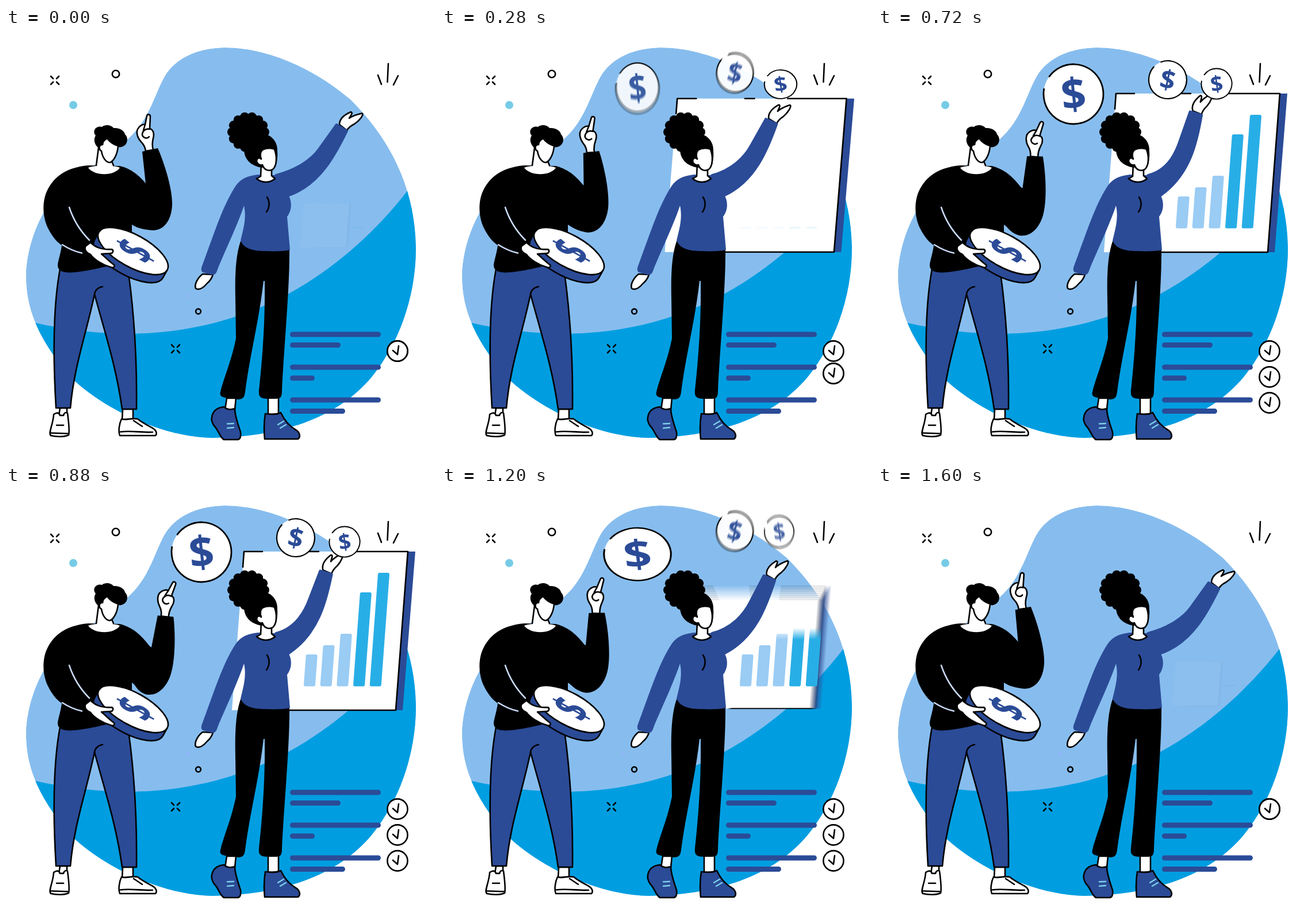
Animation, 748 px wide and 748 px high, one loop 1.64 s. Source, as an HTML page:

```html
<!DOCTYPE html>
<html lang="en">
<head>
<meta charset="utf-8">
<title>Growth presentation</title>
<style>
html, body { margin: 0; width: 100%; height: 100%; overflow: hidden; background: #fff; }
svg { display: block; width: 100vw; height: 100vh; }
.line { fill: none; stroke: #000; stroke-width: 2.6; stroke-linecap: round; stroke-linejoin: round; }
.skin { fill: #fff; stroke: #000; stroke-width: 2.6; stroke-linejoin: round; stroke-linecap: round; }
.navy { fill: #2b4b97; }
.edge { stroke: #000; stroke-width: 2.6; stroke-linejoin: round; }
.blur { isolation: isolate; }
.blur use { mix-blend-mode: plus-lighter; }
text { font-family: "Open Sans", "Noto Sans", sans-serif; font-weight: 700; text-anchor: middle; fill: #2b4b97; }
</style>
</head>
<body>
<svg viewBox="0 0 748 748">
  <defs>
    <clipPath id="blobClip"><path id="blob" d="M380 34C330 35 294 54 276 84C258 116 249 160 213 192C180 226 105 262 66 320C42 362 33 410 35 440C37 500 64 548 108 603C160 656 262 711 360 713C475 711 575 681 637 606C690 540 714 455 713 380C711 285 675 200 600 125C535 70 455 34 380 34Z"/></clipPath>
    <linearGradient id="fade" x1="0" y1="0" x2="0" y2="1">
      <stop offset="0" stop-color="#000"/><stop offset=".067" stop-color="#fff"/>
    </linearGradient>
    <mask id="wipe" maskUnits="userSpaceOnUse" x="500" y="100" width="200" height="300">
      <rect id="wipeRect" x="500" width="200" height="300" fill="url(#fade)"/>
    </mask>
    <!-- the board grows from its base, so its zero point lies there -->
    <g id="boardArt"><g transform="translate(-558 -379)">
      <path d="M699 114H712L690 390H678Z" class="navy"/>
      <path d="M414 114H699L678 390H393Z" fill="#fff"/>
      <path d="M412 141L414 114H446M528 114H544M600 114H699L678 390H480" class="line"/>
    </g></g>
    <g id="tick">
      <circle r="17.6" class="skin"/>
      <path d="M-8 -1L0 6L2 -9" class="line"/>
    </g>
    <path id="cross" class="line" d="M-7 -7l4 4M7 -7l-4 4M-7 7l4 -4M7 7l-4 -4"/>
  </defs>

  <g clip-path="url(#blobClip)">
    <use href="#blob" fill="#87bdee"/>
    <path d="M30 508C200 550 330 532 440 487C540 445 630 372 700 281L748 220V748H0V500Z" fill="#009ee1"/>
  </g>

  <use href="#cross" x="85" y="91"/>
  <use href="#cross" x="295" y="558"/>
  <circle cx="191" cy="80" r="6.2" class="line"/>
  <circle cx="334.5" cy="493" r="4.4" class="line"/>
  <circle cx="117" cy="134" r="7" fill="#76cbe6"/>
  <circle cx="316" cy="466" r="3" fill="#8fb5f6"/>
  <path d="M665 62L663.5 94M647 82L653 98M682 83L674 99" class="line"/>

  <g id="board" class="blur"></g>
  <g id="bars" mask="url(#wipe)" stroke-width="6" stroke-linejoin="round"></g>

  <path d="M498.500 533h149M498.500 551.500h79M498.500 590h149M498.500 609h34M498.500 647h149M498.500 666.500h87" stroke="#2b4b97" stroke-width="9" stroke-linecap="round"/>
  <use href="#tick" x="681" y="562"/>
  <use href="#tick" x="681" id="tick2"/>
  <use href="#tick" x="681" id="tick3"/>

  <!-- man -->
  <g>
    <path d="M94 661L92 674H106L106 661Z" class="skin"/>
    <path d="M203 663L202 682H221L221 663Z" class="skin"/>
    <path d="M83 672C88 669 92 668 94 674L100 674C101 669 105 668 107 670C109 685 111 700 109 708C100 712 86 711 78 709C73 704 82 690 83 672Z" class="skin"/>
    <path d="M88 691H100M79 704.500L108 705.500" class="line"/>
    <path d="M201 680C208 683 216 678 229 680C236 686 246 691 255 696C262 700 263 706 260 709H198C195 702 197 688 201 680Z" class="skin"/>
    <path d="M199 702.500C218 700 236 704 255 703M222 683L237 693" class="line"/>
    <path d="M97 405C82 470 81 560 87 661L112 661C118 590 140 530 154 463C172 530 192 590 202 663H227C228 580 223 490 210 405Z" class="navy edge"/>
    <path d="M154 464C154 457 160 451 168 450" class="line"/>
    <path d="M143 239C110 242 86 255 73 280C62 300 63 330 74 350C80 362 88 372 97 378C95 392 92 400 90 411C89 422 98 427 118 425C150 422 165 416 190 412L219 400V342L250 320V279C236 260 220 245 198 240Z"/>
    <path d="M143 243C155 238 186 238 198 243C188 258 154 258 143 243Z" fill="#fff"/>
    <path d="M161 208L157 240C165 247 180 246 187 239L184 231Z" fill="#fff"/>
    <path d="M161 208L157 239M184 232L187 239" class="line"/>
    <path d="M161 209C153 202 152 193 156 187C149 179 157 169 167 172C173 167 183 169 187 174C198 173 206 179 207 185C214 191 211 204 203 206C198 209 193 207 190 203L170 215Z"/>
    <path d="M168 203C168 198 172 194 176 192C181 199 188 203 195 205C194 219 188 231 181 234C174 234 168 226 166 214C161 212 161 202 168 203Z" class="skin"/>
    <path d="M110 312C118 336 130 354 145 369M98 377C109 384 120 389 132 391.500" fill="none" stroke="#cbdcf9" stroke-width="2.5" stroke-linecap="round"/>
    <g transform="translate(221 388) rotate(29)">
      <path d="M-68 0V16A68 28 0 0 0 68 16V0Z" class="navy edge"/>
      <ellipse rx="68" ry="28" class="skin"/>
      <g transform="translate(3 -2) scale(1 .45) rotate(-90)"><text y="32" font-size="90">$</text></g>
    </g>
    <path d="M138 380L147 373C155 381 165 386 184 385C188 387 186 392 182 392L166 393C173 399 181 407 188 412C190 416 186 418 182 416C168 412 152 402 147 394C140 391 136 386 138 380Z" class="skin"/>
    <g id="manHand">
      <path d="M243 214C242 206 239 202 235 198C229 192 226 182 229 176C232 170 238 167 242 168L245 153C246 149 251 150 251 154L250 175C257 177 258 185 256 192C254 200 254 205 256 212Z" class="skin"/>
      <path d="M250 176C242 174 237 180 237 186C239 192 246 193 249 189M242 168L239 178" class="line"/>
    </g>
    <path id="manArm"/>
  </g>

  <!-- woman -->
  <g>
    <path d="M384 644L381 664H398L400 644ZM456 643V672H474V643Z" class="skin"/>
    <path d="M358 677C360 664 370 660 379 659C386 665 392 664 398 662C398 675 404 690 408 703C409 712 407 716 402 716H379C372 712 370 700 362 692C358 686 357 682 358 677Z" class="navy edge"/>
    <path d="M451 671C448 690 449 705 450 715H508C513 711 511 703 504 699C492 692 484 682 478 669C470 673 460 672 451 671Z" class="navy edge"/>
    <path d="M385 688.500L396 688M385 696L396 695M473 690L483 684M477 696L487 690" stroke="#7ccfe8" stroke-width="2.4" stroke-linecap="round"/>
    <path d="M408 371C400 395 398 425 399 470L400 540C392 580 380 605 373 633C371 641 376 643 390 644L404 646C413 646 415 641 416 633C424 570 440 510 448 440H450C451 510 446 575 440 630C439 641 442 645 455 645H468C479 645 480 641 480 630C483 560 494 450 493 382Z"/>
    <path d="M342 428C334 434 327 446 330 453C336 457 344 451 350 444C355 440 358 435 360 429Z" class="skin"/>
    <path id="womanHand" d="M580 168C580 158 588 151 600 146C604 147 600 152 597 157C604 152 612 150 619 148.500C624 150 614 162 606 167C600 170 596 173 593 178Z" class="skin"/>
    <path id="womanArm" class="navy" stroke="#2b4b97" stroke-width="4" stroke-linejoin="round"/>
    <path d="M438 255C420 257 409 262 400 274C378 307 364 352 340 417C339 423 341 425 346 426L358 429.500C364 430 366 426 368 420C379 392 402 345 414 309C419 332 412 352 408 370C414 384 430 388 452 388C470 389 485 388 494 386L489 328C497 318 498 303 492 292L480 252L466 256Z" class="navy"/>
    <path d="M454 294C459 302 459 312 453 320" class="line"/>
    <path d="M444 236L443 258C440 260 438 261 436 262C445 270 459 270 468 262L462 257V244Z" class="skin"/>
    <g id="bun"><circle cx="421.500" cy="181" r="32"/></g>
    <path d="M414 208C416 190 428 184 442 183C462 184 473 198 472 215C473 224 471 234 470 238L445 243C426 240 413 228 414 208Z"/>
    <path d="M444 228C441 221 443 215 446 212C452 209 462 208 467 211C472 224 471 240 464 246C457 250 449 247 446 238C440 240 434 234 437 228C439 225 442 226 444 228Z" class="skin"/>
  </g>

  <g id="coins"></g>
</svg>
<script>
const LOOP = 1640, STEP = 40, SHUTTER = 20, COPIES = 8, FLIGHT = 200;
const NS = "http://www.w3.org/2000/svg";
const $ = id => document.getElementById(id);

function add(parent, tag, attrs) {
  const el = document.createElementNS(NS, tag);
  for (const k in attrs) el.setAttribute(k, attrs[k]);
  return parent.appendChild(el);
}

const ramp = (t, a, b) => Math.min(1, Math.max(0, (t - a) / (b - a)));
const ease = (t, a, b) => { const u = ramp(t, a, b); return u * u * (3 - 2 * u); };
const bump = (t, a, b) => Math.sin(Math.PI * ramp(t, a, b)) ** 2;
const swing = (t, peak, end) => ramp(t, 0, peak) - ramp(t, peak, end);

// Point (x, y) turned by deg about (cx, cy), as path text.
function turner(cx, cy, deg) {
  const c = Math.cos(deg * Math.PI / 180), s = Math.sin(deg * Math.PI / 180);
  return (x, y) => {
    const dx = x - cx, dy = y - cy;
    return `${(cx + dx * c - dy * s).toFixed(2)} ${(cy + dx * s + dy * c).toFixed(2)}`;
  };
}

// The arms turn while their shoulder points stay fixed.
function moveMan(t) {
  const deg = 18.3 * swing(t, 940, LOOP), p = turner(216, 309, deg);
  $("manHand").setAttribute("transform", `rotate(${deg} 216 309)`);
  $("manArm").setAttribute("d", `M215 255L${p(243, 271)}L${p(237, 215)}L${p(264, 209)}` +
    `C${p(276, 236)} ${p(290, 282)} ${p(289, 308)}C${p(288, 333)} ${p(276, 351)} ${p(257, 352)}` +
    `C${p(240, 351)} 228 348 219 342L205 300Z`);
}
function moveWoman(t) {
  const deg = -17 * swing(t, 755, 1600), p = turner(480, 270, deg);
  $("womanHand").setAttribute("transform", `rotate(${deg} 480 270)`);
  $("womanArm").setAttribute("d", `M470 256C505 247 ${p(532, 229)} ${p(545, 210)}L${p(575, 168)}` +
    `L${p(593, 179)}C${p(572, 222)} ${p(545, 273)} 492 291Z`);
}

// Pose: position, scale and opacity; squash widens and flattens.
const board = {
  pose: t => ({
    x: 558, y: 379,
    scale: .28 + .72 * (ease(t, 50, 220) - ease(t, 1100, 1340)) + .03 * bump(t, 970, 1150),
    opacity: .04 + .96 * (ramp(t, 50, 110) - ramp(t, 1260, 1330))
  }),
  squash: t => .085 * bump(t, 170, 310) + .03 * bump(t, 970, 1150)
};

function coinMotion({ x, y, dx, dy, r, land, leave, amp, dip, shrink }) {
  const away = t => 1 - ease(t, land - FLIGHT, land) + ease(t, leave, leave + FLIGHT);
  const squash = t => amp * (bump(t, land - 20, land - 20 + dip) + bump(t, leave - dip, leave)
    - .6 * Math.sin(Math.PI * away(t)));
  const pose = t => {
    const p = away(t);
    return {
      x: x + dx * p, y: y + dy * p + .6 * r * Math.max(0, squash(t)),
      scale: 1 - shrink * p, opacity: 1 - p ** 3
    };
  };
  return { pose, squash };
}

const coins = [
  { x: 340, y: 115, dx: 0, dy: -22, r: 52, size: 76, tilt: -6, gap: 203, line: 2.8, land: 380, leave: 1290, amp: .12, dip: 180, shrink: .45 },
  { x: 504, y: 90, dx: 16, dy: -34, r: 33, size: 46, tilt: 12, gap: 236, line: 2.2, land: 360, leave: 1122, amp: .06, dip: 120, shrink: 0 },
  { x: 589, y: 97, dx: -5, dy: -35, r: 26.5, size: 38, tilt: -8, gap: 203, line: 1.9, land: 240, leave: 1100, amp: .06, dip: 120, shrink: 0 }
];

// Averages several copies over the shutter time, for motion blur.
function blurred(group, href, { pose, squash }) {
  const copies = Array.from({ length: COPIES }, () => add(group, "use", { href }));
  return t => {
    const w = squash(t);
    const place = time => {
      const { x, y, scale } = pose(time);
      return `translate(${x} ${y}) scale(${scale * (1 + w)} ${scale * (1 - w)})`;
    };
    const still = place(t - SHUTTER / 2) === place(t + SHUTTER / 2);
    group.setAttribute("opacity", pose(t).opacity);
    copies.forEach((c, i) => {
      c.setAttribute("transform", place(t + SHUTTER * (i / (COPIES - 1) - .5)));
      c.setAttribute("opacity", still ? +(i === 0) : 1 / COPIES);
    });
  };
}

const movers = [moveMan, moveWoman, blurred($("board"), "#boardArt", board)];

coins.forEach((c, i) => {
  const art = add(document.querySelector("defs"), "g", { id: "coin" + i });
  const at = turner(0, 0, c.gap);
  const [h, v] = [c.r * Math.cos(.23), c.r * Math.sin(.23)];
  add(art, "circle", { r: c.r, fill: "#fff" });
  add(art, "path", {
    d: `M${at(h, v)}A${c.r} ${c.r} 0 1 1 ${at(h, -v)}`,
    class: "line", style: `stroke-width:${c.line}`
  });
  add(art, "text", { y: c.size * .355, "font-size": c.size, transform: `rotate(${c.tilt})` }).textContent = "$";
  movers.push(blurred(add($("coins"), "g", { class: "blur" }), "#coin" + i, coinMotion(c)));
});

[293, 277, 257, 185, 151].forEach((top, i) => {
  const x = 521 + i * 28.7, lean = (342.5 - top) * .074, color = i < 3 ? "#9accf4" : "#28aee6";
  add($("bars"), "path", {
    d: `M${x} 345.5h14L${x + 14 + lean} ${top + 3}h-14Z`, fill: color, stroke: color
  });
});

for (let i = 0; i < 14; i++) {
  const a = i / 14 * 2 * Math.PI;
  add($("bun"), "circle", { cx: 421.5 + 28.5 * Math.cos(a), cy: 181 + 27 * Math.sin(a), r: 8 });
}

function draw(t) {
  const second = 562 + 45 * (ramp(t, 20, 320) - ramp(t, 1400, 1580));
  $("tick2").setAttribute("y", second);
  $("tick3").setAttribute("y", second + 45 * (ramp(t, 335, 635) - ramp(t, 1220, 1400)));
  $("wipeRect").setAttribute("y", 345 - 214 * (ramp(t, 285, 515) - ramp(t, 1070, 1310)));
  movers.forEach(move => move(t));
}

function loop() {
  draw(Math.floor(performance.now() % LOOP / STEP) * STEP);
  requestAnimationFrame(loop);
}
loop();
</script>
</body>
</html>
```
